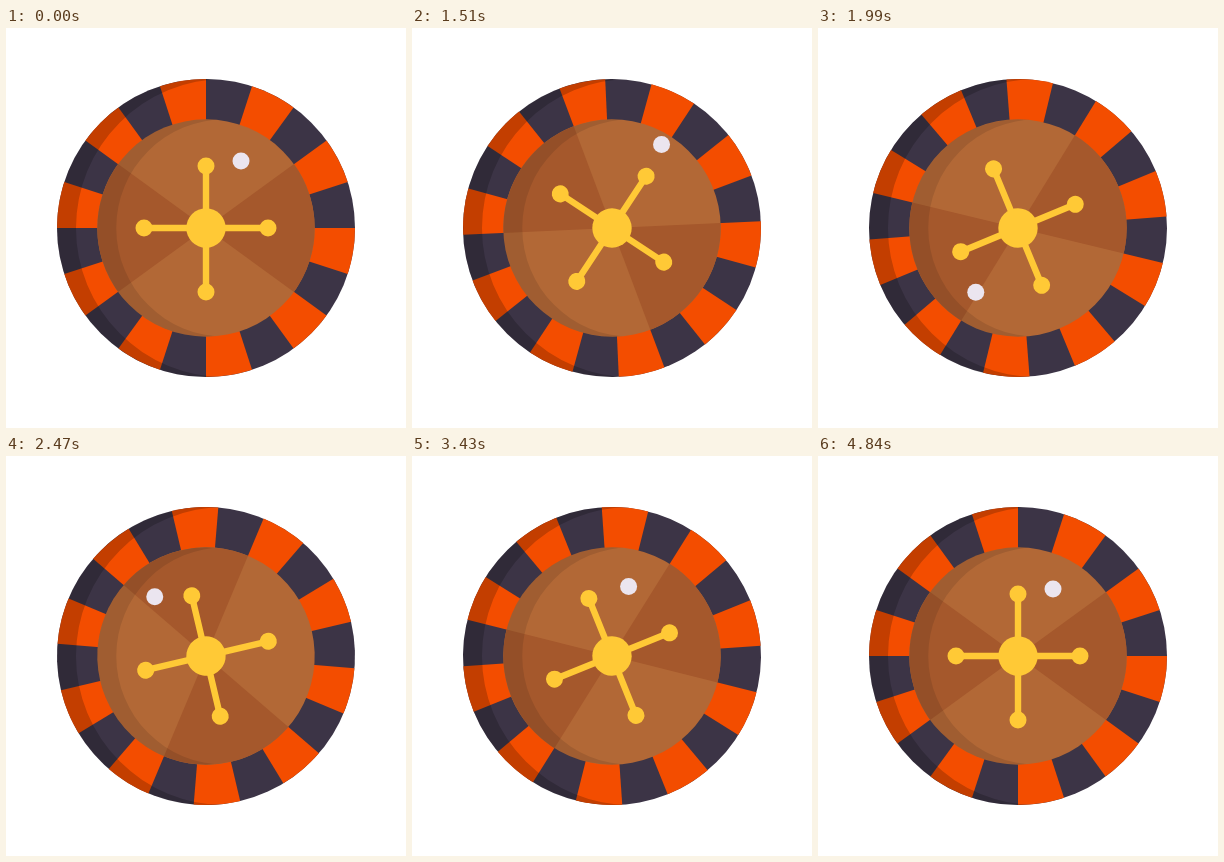
An HTML page with a canvas that plays this animation: 400 px wide and 400 px high, repeating every 4.87 s.

```html
<!DOCTYPE html>
<html lang="en">
<head>
<meta charset="utf-8">
<title>Roulette wheel</title>
<style>
html, body { margin: 0; width: 100%; height: 100%; overflow: hidden; background: #fff; }
canvas { display: block; width: 100vw; height: 100vh; object-fit: contain; }
</style>
</head>
<body>
<canvas id="stage"></canvas>
<script>
const SIZE = 400, LOOP = 4870, HOLD = 1000, STEP = 30, SPIN = 3600;
const RIM = 149, DISC = 108.7, SHADE_SHIFT = 19;
const RED = '#f34d00', DARK = '#3c3446', WOOD = '#b26836', WOOD_DARK = '#a5582c';
const GOLD = '#ffc936', BALL = '#ebe5ef';
const TAU = Math.PI * 2, RAD = Math.PI / 180;

// Ball path relative to the turning wheel: time, angle from top, radius
const ballKeys = [
  [0, 27.6, 75.6],
  [510, -2.7, 97.1],
  [990, 55.8, 76.8],
  [1470, 62.4, 78.3],
  [2430, 35.4, 71.4],
  [3210, 30.1, 88.6],
  [3840, 27.6, 75.6]
];

const canvas = document.getElementById('stage');
const ctx = canvas.getContext('2d');
const scale = Math.max(1, window.devicePixelRatio || 1);
canvas.width = canvas.height = SIZE * scale;

const bez = (a, b, s) => 3 * (1 - s) * (1 - s) * s * a + 3 * (1 - s) * s * s * b + s * s * s;

function ease(x) {
  if (x <= 0) return 0;
  if (x >= 1) return 1;
  let lo = 0, hi = 1;
  for (let i = 0; i < 30; i++) {
    const mid = (lo + hi) / 2;
    if (bez(0.333, 0.13, mid) < x) lo = mid; else hi = mid;
  }
  return bez(0, 1, lo);
}

// Monotone cubic interpolation through column c of the keys
function track(keys, c, t) {
  const last = keys.length - 1;
  const slope = i => (keys[i + 1][c] - keys[i][c]) / (keys[i + 1][0] - keys[i][0]);
  const tangent = i => {
    if (i === 0 || i === last) return 0;
    const a = slope(i - 1), b = slope(i);
    return a * b <= 0 ? 0 : 2 * a * b / (a + b);
  };
  let i = 0;
  while (i < last - 1 && t > keys[i + 1][0]) i++;
  const h = keys[i + 1][0] - keys[i][0];
  const u = Math.min(1, Math.max(0, (t - keys[i][0]) / h));
  const v = 1 - u;
  return keys[i][c] * (1 + 2 * u) * v * v + tangent(i) * h * u * v * v
    + keys[i + 1][c] * u * u * (3 - 2 * u) - tangent(i + 1) * h * u * u * v;
}

function circle(x, y, r, color) {
  ctx.fillStyle = color;
  ctx.beginPath();
  ctx.arc(x, y, r, 0, TAU);
  ctx.fill();
}

// Angles in degrees, clockwise from the top
function wedge(r, from, to, color) {
  ctx.fillStyle = color;
  ctx.beginPath();
  ctx.moveTo(0, 0);
  ctx.arc(0, 0, r, (from - 90) * RAD, (to - 90) * RAD);
  ctx.fill();
}

// Left crescent: a circle minus the same circle moved right
function crescent(r, alpha) {
  ctx.save();
  ctx.beginPath();
  ctx.arc(0, 0, r, 0, TAU);
  ctx.clip();
  ctx.fillStyle = `rgba(0,0,0,${alpha})`;
  ctx.beginPath();
  ctx.rect(-SIZE, -SIZE, SIZE * 2, SIZE * 2);
  ctx.moveTo(SHADE_SHIFT + r, 0);
  ctx.arc(SHADE_SHIFT, 0, r, 0, TAU);
  ctx.fill('evenodd');
  ctx.restore();
}

function turned(angle, draw) {
  ctx.save();
  ctx.rotate(angle * RAD);
  draw();
  ctx.restore();
}

function drawRim() {
  circle(0, 0, RIM, DARK);
  for (let a = 18; a < 360; a += 36) wedge(RIM, a, a + 18, RED);
}

function drawDisc() {
  circle(0, 0, DISC, WOOD);
  wedge(DISC, 54, 126, WOOD_DARK);
  wedge(DISC, 234, 306, WOOD_DARK);
}

function drawCross() {
  ctx.strokeStyle = GOLD;
  ctx.lineWidth = 6.4;
  ctx.beginPath();
  ctx.moveTo(-62, 0);
  ctx.lineTo(62, 0);
  ctx.moveTo(0, -62);
  ctx.lineTo(0, 64);
  ctx.stroke();
  for (const [x, y] of [[-62, 0], [62, 0], [0, -62], [0, 64]]) circle(x, y, 8.5, GOLD);
  circle(0, 0, 19.7, GOLD);
}

function render(time) {
  const t = Math.max(0, Math.floor((time - HOLD) / STEP) * STEP);
  const angle = 360 * ease(t / SPIN);
  const ballAngle = (angle + track(ballKeys, 1, t)) * RAD;
  const ballRadius = track(ballKeys, 2, t);

  ctx.setTransform(scale, 0, 0, scale, 0, 0);
  ctx.fillStyle = '#fff';
  ctx.fillRect(0, 0, SIZE, SIZE);
  ctx.translate(SIZE / 2, SIZE / 2);

  turned(angle, drawRim);
  crescent(RIM, 0.2);
  turned(angle, drawDisc);
  crescent(DISC, 0.1);
  turned(angle, drawCross);
  circle(Math.sin(ballAngle) * ballRadius, -Math.cos(ballAngle) * ballRadius, 8.5, BALL);
}

const start = performance.now();
function tick() {
  render((performance.now() - start) % LOOP);
  requestAnimationFrame(tick);
}
tick();
</script>
</body>
</html>
```
